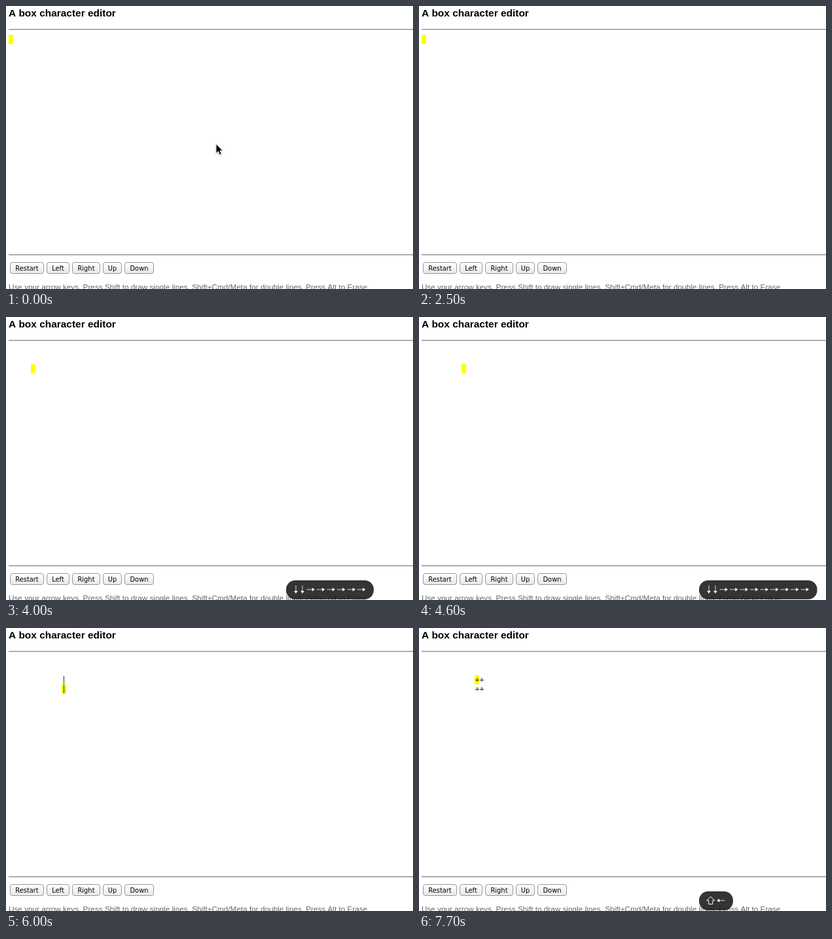
Write an HTML page with a canvas that moves like this. It is 622x432 px and loops after 8 s.

```html
<!DOCTYPE html>
<html lang="en">
<head>
<meta charset="utf-8">
<title>A box character editor</title>
<style>
  html, body { margin: 0; width: 100%; height: 100%; overflow: hidden; background: #fff; }
  canvas { display: block; }
</style>
</head>
<body>
<canvas id="stage" width="622" height="432"></canvas>
<script>
const ctx = document.getElementById('stage').getContext('2d');
const LOOP = 8000;
const CELL_W = 6.75, CELL_H = 14, LEFT = 4, TOP = 44;
const BUTTONS = [['Restart', 6, 52], ['Left', 62, 35], ['Right', 101, 43], ['Up', 148, 29], ['Down', 181, 45]];

// Plain moves: when each key is shown on the badge and when the cursor follows.
const walk = Array.from('ddrrrrrrrrrrrr', (key, n) => {
  const shown = n < 10 ? 2600 + 200 * n : 4600 + 100 * (n - 10);
  const lag = n < 10 && n !== 4 ? 100 : 0;
  return { key, shown, moved: shown + lag };
});
const WALK_END = 5200;

// Drawing moves with shift held: badge interval, then cursor and cells.
const strokes = [
  { key: 'd', from: 5500, to: 6000, moved: 5700, col: 12, row: 3, cells: [[12, 2, '|'], [12, 3, '|']] },
  { key: 'r', from: 6300, to: 6500, moved: 6300, col: 13, row: 3, cells: [[12, 3, '+'], [13, 3, '-']] },
  { key: 'u', from: 7000, to: 7500, moved: 7000, col: 13, row: 2, cells: [[13, 3, '+'], [13, 2, '|']] },
  { key: 'l', from: 7700, to: LOOP, moved: 7700, col: 12, row: 2, cells: [[13, 2, '+'], [12, 2, '+']] }
];

function stateAt(t) {
  const s = { col: 0, row: 0, cells: {}, keys: '' };
  for (const k of walk) {
    if (t >= k.moved) k.key === 'd' ? s.row++ : s.col++;
    if (t >= k.shown && t < WALK_END) s.keys += k.key;
  }
  for (const k of strokes) {
    if (t >= k.from && t < k.to) s.keys = 's' + k.key;
    if (t < k.moved) continue;
    s.col = k.col;
    s.row = k.row;
    for (const [c, r, ch] of k.cells) s.cells[c + ',' + r] = ch;
  }
  return s;
}

function rect(color, x, y, w, h) {
  ctx.fillStyle = color;
  ctx.fillRect(x, y, w, h);
}

function text(str, x, y, font, color, align = 'left') {
  ctx.font = font;
  ctx.fillStyle = color;
  ctx.textAlign = align;
  ctx.fillText(str, x, y);
}

function poly(points) {
  ctx.beginPath();
  points.forEach(([x, y]) => ctx.lineTo(x, y));
  ctx.closePath();
}

function pill(x, y, w, h, r) {
  ctx.beginPath();
  ctx.roundRect(x, y, w, h, r);
}

function rule(y) {
  rect('#8c8c92', LEFT, y, 618, 1);
  rect('#d2d2d4', LEFT, y + 1, 618, 1);
}

function button([label, x, w]) {
  const fill = ctx.createLinearGradient(0, 391, 0, 409);
  fill.addColorStop(0, '#fff');
  fill.addColorStop(0.5, '#f4f4f4');
  fill.addColorStop(1, '#e6e6e6');
  pill(x + 0.5, 391.5, w - 1, 17, 3.5);
  ctx.fillStyle = fill;
  ctx.fill();
  ctx.strokeStyle = '#989898';
  ctx.lineWidth = 1;
  ctx.stroke();
  text(label, x + w / 2, 404, '9.9px "DejaVu Sans", sans-serif', '#000', 'center');
}

function page() {
  rect('#fff', 0, 0, 622, 432);
  text('A box character editor', 4, 15.5, 'bold 15.45px "Liberation Sans", Arial, sans-serif', '#000');
  rule(35);
  rule(379);
  BUTTONS.forEach(button);
  text('Use your arrow keys. Press Shift to draw single lines. Shift+Cmd/Meta for double lines. Press Alt to Erase',
    4, 432.5, '11.75px "Liberation Sans", Arial, sans-serif', '#666');
}

function cellMark(col, row, ch) {
  const x = Math.round(LEFT + col * CELL_W), y = TOP + row * CELL_H;
  if (ch === '|') return rect('#333', x + 3, y + 1, 1, 13);
  rect('#333', x + 1, y + 7, 6, 1);
  if (ch === '+') rect('#333', x + 3.5, y + 4, 1, 6);
}

function pointer() {
  ctx.save();
  ctx.translate(321, 210.5);
  poly([[0, 0], [0, 14.5], [3.3, 11.4], [5.7, 16.8], [8.4, 15.6], [6, 10.4], [10.4, 10.4]]);
  ctx.shadowColor = 'rgba(0,0,0,.45)';
  ctx.shadowBlur = 3;
  ctx.shadowOffsetY = 1;
  ctx.fillStyle = '#000';
  ctx.fill();
  ctx.shadowColor = 'transparent';
  ctx.strokeStyle = '#fff';
  ctx.lineWidth = 1;
  ctx.stroke();
  ctx.restore();
}

const TURN = { r: 0, d: Math.PI / 2, l: Math.PI, u: -Math.PI / 2 };
const advance = key => key === 'd' || key === 'u' ? 10 : 15.5;

function keyGlyph(key, x, y) {
  ctx.save();
  ctx.translate(x + advance(key) / 2, y);
  ctx.fillStyle = ctx.strokeStyle = '#fff';
  ctx.lineWidth = 1;
  if (key === 's') {
    poly([[0, -6], [6, 0], [3, 0], [3, 5.5], [-3, 5.5], [-3, 0], [-6, 0]]);
    ctx.stroke();
  } else {
    ctx.rotate(TURN[key]);
    for (let i = 0; i < 4; i++) ctx.fillRect(-6 + i * 2.3, -0.6, 1.5, 1.2);
    poly([[2, -2.7], [6.2, 0], [2, 2.7]]);
    ctx.fill();
  }
  ctx.restore();
}

function badge(keys) {
  const lines = [keys.slice(0, 11), keys.slice(11)].filter(Boolean);
  const width = Array.from(lines[0]).reduce((sum, k) => sum + advance(k), 21);
  const extra = (lines.length - 1) * 21;
  pill(428, 402 - extra, width, 29 + extra, 14);
  ctx.fillStyle = 'rgba(30,30,30,.9)';
  ctx.fill();
  lines.forEach((line, i) => {
    let x = 438;
    for (const k of line) {
      keyGlyph(k, x, 416 - extra + i * 21);
      x += advance(k);
    }
  });
}

function draw(t) {
  const s = stateAt(t);
  page();
  rect('#ff0', Math.round(LEFT + s.col * CELL_W), TOP + s.row * CELL_H, 7, CELL_H);
  for (const [at, ch] of Object.entries(s.cells)) cellMark(...at.split(',').map(Number), ch);
  if (t < 900) pointer();
  if (s.keys) badge(s.keys);
}

const start = performance.now();
function tick() {
  draw((performance.now() - start) % LOOP);
  requestAnimationFrame(tick);
}
tick();
</script>
</body>
</html>
```
